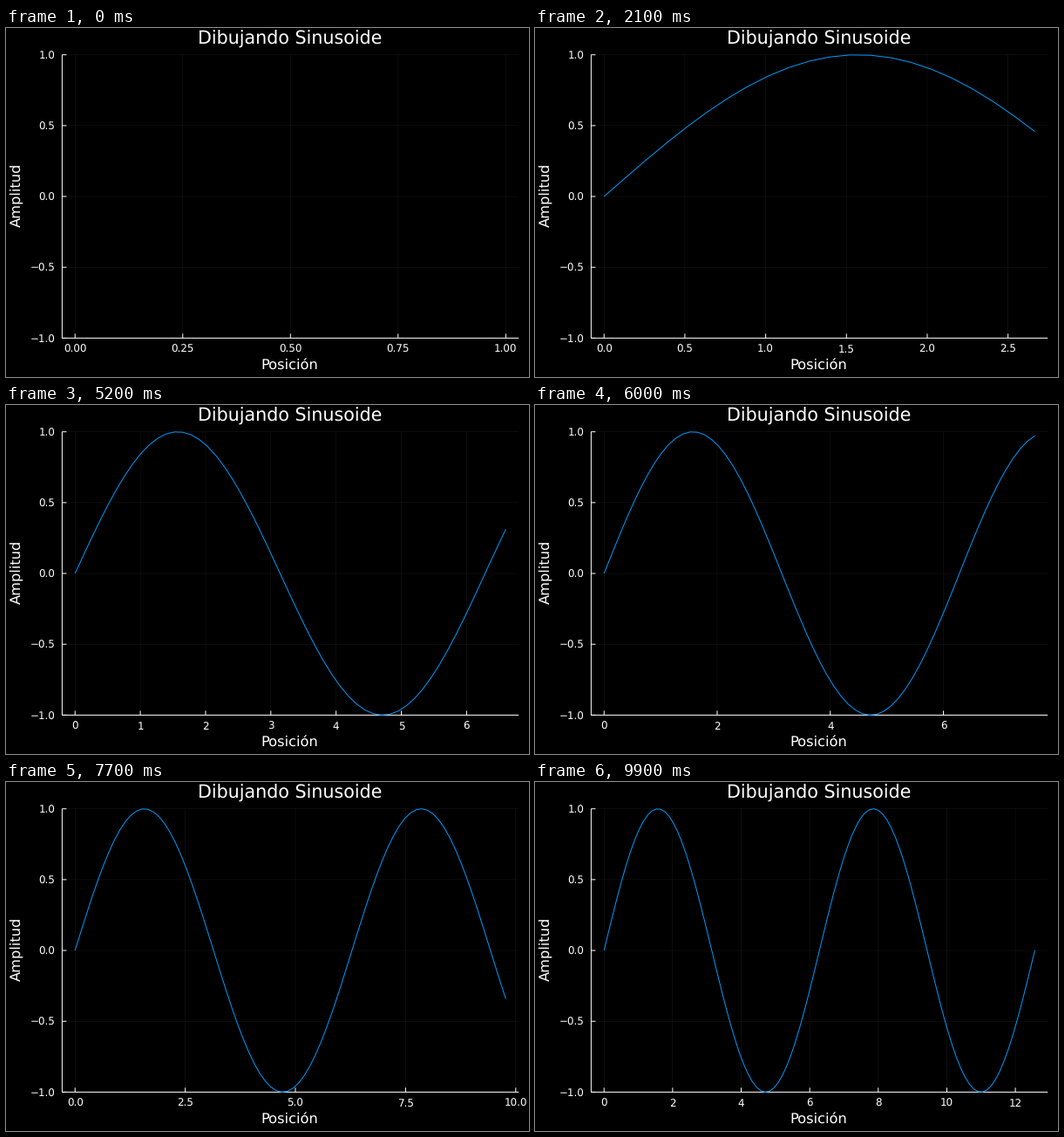
Animation of 600x400 px, one loop 10 s. Source, as a matplotlib script:

```python
import math

import matplotlib.pyplot as plt
import numpy as np
from matplotlib.animation import FuncAnimation

W, H, DPI = 600, 400, 100
FRAMES, INTERVAL = 100, 100
LEFT, RIGHT, TOP, BOTTOM = 64.4, 588.2, 30.7, 355.4
PAD = 0.03
MAX_TICKS = 8
STEPS = [(1, 1.0), (5, 0.9), (2, 0.7), (2.5, 0.5), (3, 0.2)]  # step, niceness

plt.rcParams["font.family"] = "DejaVu Sans"
plt.rcParams["text.hinting"] = "no_hinting"
plt.rcParams["path.snap"] = False


def pt(px):
    return px * 72 / DPI


def pick_ticks(end):
    """Best-scoring ticks (and decimals) for an axis over 0..end plus padding."""
    span, limit = end * (1 + 2 * PAD), end * (1 + PAD)
    top = math.floor(math.log10(span))
    best = (-math.inf, 0, 0, 0)
    for power in (top, top - 1):
        for base, nice in STEPS:
            step = base * 10.0 ** power
            n = int(limit / step + 1e-9) + 1
            if not 4 <= n <= MAX_TICKS:
                continue
            balance = 1 - abs(n - 5) / 5
            cover = 1.5 * span / ((n - 1) * step)
            score = round(balance / 4 + cover / 3 + nice / 4, 9)
            decimals = max(0, (base == 2.5) - power)
            best = max(best, (score, step, n, decimals))
    _, step, n, decimals = best
    return step * np.arange(n), decimals


def to_x(value, end):
    return LEFT + (value / end + PAD) / (1 + 2 * PAD) * (RIGHT - LEFT)


def to_y(value):
    return BOTTOM - (value + 1) / 2 * (BOTTOM - TOP)


fig = plt.figure(figsize=(W / DPI, H / DPI), dpi=DPI, facecolor="black")
ax = fig.add_axes([0, 0, 1, 1])
ax.set(xlim=(0, W), ylim=(H, 0))
ax.axis("off")


def rule(xs=(), ys=(), grid=False):
    width, alpha = (0.5, 0.1) if grid else (1, 1)
    return ax.plot(xs, ys, color="white", lw=pt(width), alpha=alpha,
                   solid_capstyle="butt", zorder=1 if grid else 2)[0]


def label(x, y, text="", size=11.9, ha="center", **kw):
    return ax.text(x, y, text, color="white", fontsize=pt(size), ha=ha,
                   va="baseline", **kw)


label(325.7, 19, "Dibujando Sinusoide", 20.7)
label(325, 392, "Posición", 16.3)
label(17, 191.7, "Amplitud", 16.3, rotation=90, rotation_mode="anchor")

rule([LEFT, LEFT], [TOP, BOTTOM])
rule([LEFT, RIGHT], [BOTTOM, BOTTOM])
for v in np.linspace(-1, 1, 5):
    y = to_y(v)
    rule([LEFT, RIGHT], [y, y], grid=True)
    rule([LEFT, LEFT + 5], [y, y])
    label(56.3, y + 5, f"{v:.1f}".replace("-", "\u2212"), ha="right")

x_ticks = [(rule(grid=True), rule(), label(0, 372)) for _ in range(MAX_TICKS)]
curve, = ax.plot([], [], color="#009afa", lw=pt(1), zorder=3,
                 solid_capstyle="butt", clip_on=False)
xs = np.linspace(0, 4 * np.pi, FRAMES)


def draw(i):
    end = xs[i] or 1.0
    shown = xs[:i + 1] if i else xs[:0]
    curve.set_data(to_x(shown, end), to_y(np.sin(shown)))

    values, decimals = pick_ticks(end)
    for k, (grid, mark, text) in enumerate(x_ticks):
        used = k < len(values)
        for artist in (grid, mark, text):
            artist.set_visible(used)
        if used:
            x = to_x(values[k], end)
            grid.set_data([x, x], [TOP, BOTTOM])
            mark.set_data([x, x], [BOTTOM - 5, BOTTOM])
            text.set_x(x)
            text.set_text(f"{values[k]:.{decimals}f}")
    return [curve, *(artist for tick in x_ticks for artist in tick)]


anim = FuncAnimation(fig, draw, frames=FRAMES, interval=INTERVAL,
                     repeat=True, repeat_delay=0, blit=False)
plt.show()
```
